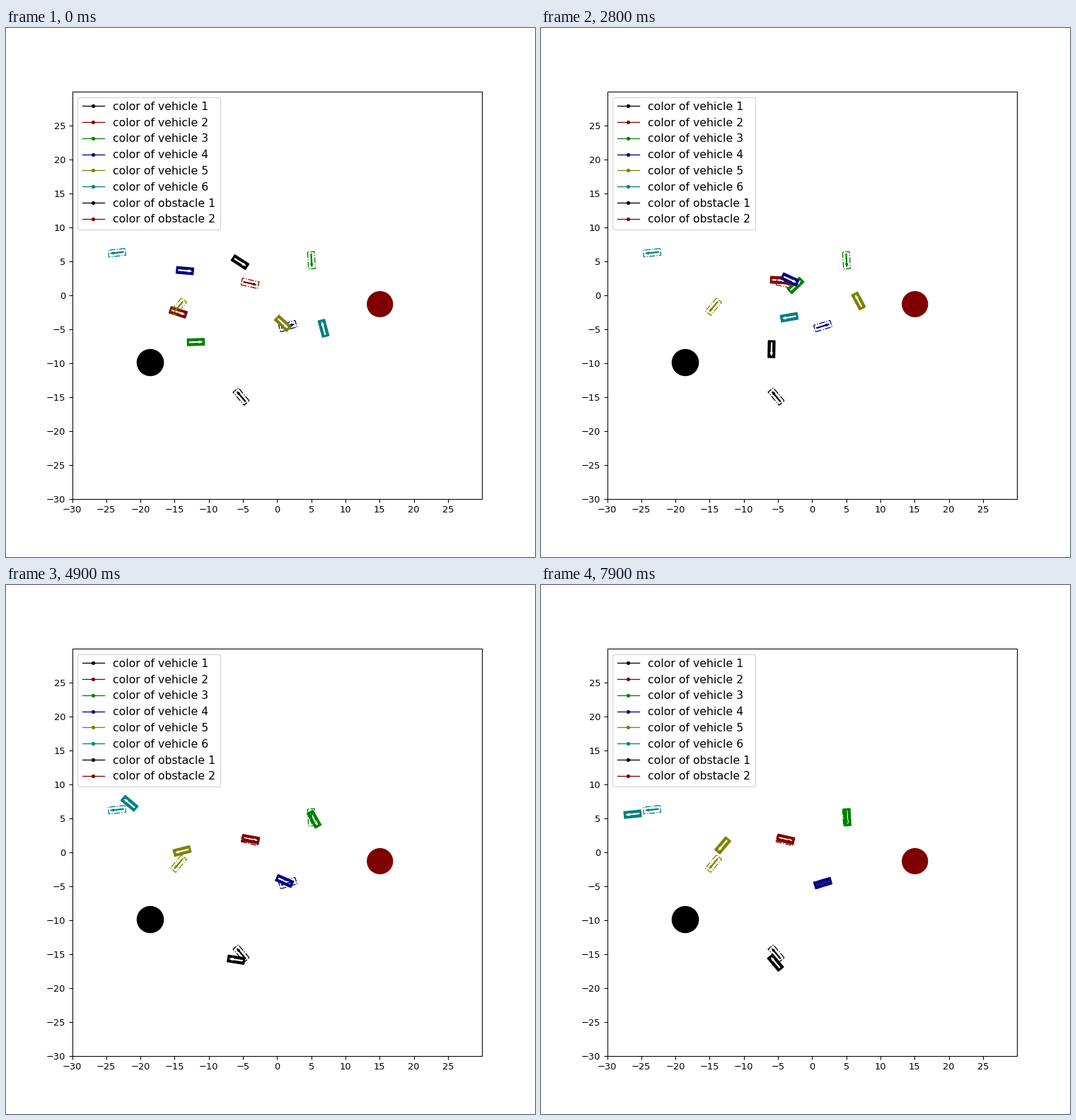
A matplotlib script for the animation above (8 s loop, 748 by 748 pixels).

```python
import numpy as np
import matplotlib.pyplot as plt
from matplotlib.animation import FuncAnimation
from matplotlib.lines import Line2D
from matplotlib.patches import Circle, Polygon

FRAMES, INTERVAL = 80, 100
WAY_TIMES = [0, 27, 41, 55]
SETTLED = 70

LENGTH, WIDTH = 2.5, 1.0
BODY = np.array([(-1, -1), (1, -1), (1, 1), (-1, 1)]) * (LENGTH / 2, WIDTH / 2)
ARROW = np.array([(-0.95, -0.05), (0.5, -0.05), (0.5, -0.15), (0.95, 0),
                  (0.5, 0.15), (0.5, 0.05), (-0.95, 0.05)])


def unit(deg):
    a = np.radians(deg)
    return np.array([np.cos(a), np.sin(a)])


def place(shape, pos, deg):
    c, s = unit(deg)
    return shape @ np.array([(c, s), (-s, c)]) + pos


def hermite(p, q, m, n, u):
    """Point and slope of the cubic from p to q with end slopes m and n."""
    point = p + u * u * (3 - 2 * u) * (q - p) + u * (1 - u) ** 2 * m + u * u * (u - 1) * n
    slope = 6 * u * (1 - u) * (q - p) + (1 - u) * (1 - 3 * u) * m + u * (3 * u - 2) * n
    return point, slope


class Vehicle:
    """Drives along a smooth path, then turns on the spot to the goal's heading.

    Poses are (x, y, degrees); drift is how far from the goal it stops and
    shunt how far it rolls forward and back during the last turn.
    """

    def __init__(self, color, goal, way, drift=(0, 0), shunt=0):
        self.color, self.shunt = color, shunt
        self.goal, self.goal_deg = np.array(goal[:2]), goal[2]
        self.stop = self.goal + drift
        self.pos = [np.array(w[:2]) for w in way]
        self.degs = [w[2] for w in way]
        self.times = WAY_TIMES[:len(way)]

        # for a pure turn these pulls make the cubic follow a circle
        turns = np.arccos([unit(a) @ unit(b) for a, b in zip(self.degs, self.degs[1:])])
        self.pulls = np.hypot(*np.diff(self.pos, axis=0).T) / np.cos(turns / 4) ** 2
        gaps = np.diff(self.times)
        mean = self.pulls / gaps
        inner = (mean[:-1] * gaps[1:] + mean[1:] * gaps[:-1]) / (gaps[:-1] + gaps[1:])
        self.speeds = np.concatenate([[0], inner, [0]])

    def pose(self, t):
        if t >= self.times[-1]:
            return self.settle(t)
        i = np.searchsorted(self.times, t, side="right") - 1
        gap = self.times[i + 1] - self.times[i]
        a, b = np.minimum(self.speeds[i:i + 2] * gap / self.pulls[i], 2.5)
        u, _ = hermite(0, 1, a, b, (t - self.times[i]) / gap)
        m, n = (unit(d) * self.pulls[i] for d in self.degs[i:i + 2])
        pos, (dx, dy) = hermite(*self.pos[i:i + 2], m, n, u)
        return pos, np.degrees(np.arctan2(dy, dx))

    def settle(self, t):
        s = min((t - self.times[-1]) / (SETTLED - self.times[-1]), 1)
        ease = s * s * (3 - 2 * s)
        deg = self.degs[-1] + ease * (self.goal_deg - self.degs[-1])
        pos = self.pos[-1] + ease * (self.stop - self.pos[-1])
        return pos + self.shunt * np.sin(np.pi * s) ** 2 * unit(deg), deg

    def add_to(self, ax):
        self.body = ax.add_patch(Polygon(BODY, color=self.color))
        self.arrow = ax.add_patch(Polygon(ARROW, color="white"))
        at_goal = self.goal, self.goal_deg
        ax.add_patch(Polygon(place(BODY, *at_goal), fill=False, ec=self.color, ls="-."))
        ax.add_patch(Polygon(place(ARROW, *at_goal), color=self.color))

    def move(self, t):
        pose = self.pose(t)
        self.body.set_xy(place(BODY, *pose))
        self.arrow.set_xy(place(ARROW, *pose))


vehicles = [
    Vehicle("#000000", (-5.26, -14.93, 130),
            [(-5.42, 4.86, -33), (-5.94, -7.95, -91), (-5.57, -15.86, 178)],
            drift=(-0.1, -1.35), shunt=1),
    Vehicle("#800000", (-3.97, 1.74, -13),
            [(-14.47, -2.53, -18), (-4.85, 2.21, -3), (-3.87, 1.9, -10)],
            drift=(0.1, 0.16)),
    Vehicle("#008000", (5.03, 5.13, -87),
            [(-11.89, -6.91, 2), (-2.42, 1.43, 44), (5.19, 5.28, -56)],
            drift=(0.1, 0), shunt=1),
    Vehicle("#000080", (1.57, -4.56, 17),
            [(-13.49, 3.61, -5), (-3.25, 2.31, -25), (1, -4.2, -31)]),
    Vehicle("#808000", (-14.42, -1.7, 230),
            [(0.84, -4.15, -43), (6.79, -0.86, 118), (-5.21, 0.59, 188), (-15.77, -2.53, 280)],
            drift=(1.34, 2.7)),
    Vehicle("#008080", (-23.43, 6.25, 186),
            [(6.79, -4.88, 105), (-3.35, -3.26, 190), (-16.8, 1.53, 143), (-24, 7.1, 228)],
            drift=(-2.84, -0.66)),
]
obstacles = [("#000000", (-18.56, -9.93), 1.93), ("#800000", (15.05, -1.33), 1.86)]

fig, ax = plt.subplots(figsize=(8, 8), dpi=93.5)
ax.set(xlim=(-30, 30), ylim=(-30, 30),
       xticks=np.arange(-30, 30, 5), yticks=np.arange(-30, 30, 5))

for v in vehicles:
    v.add_to(ax)
for color, center, radius in obstacles:
    ax.add_patch(Circle(center, radius, color=color))

key = [(v.color, f"color of vehicle {i}") for i, v in enumerate(vehicles, 1)]
key += [(o[0], f"color of obstacle {i}") for i, o in enumerate(obstacles, 1)]
handles = [Line2D([], [], color=c, marker=".", lw=1, label=text) for c, text in key]
ax.legend(handles=handles, loc="upper left", fontsize=12)


def update(frame):
    for v in vehicles:
        v.move(max(frame - 1, 0))
    return [part for v in vehicles for part in (v.body, v.arrow)]


anim = FuncAnimation(fig, update, frames=FRAMES, interval=INTERVAL,
                     repeat=True, repeat_delay=0)
plt.show()
```
